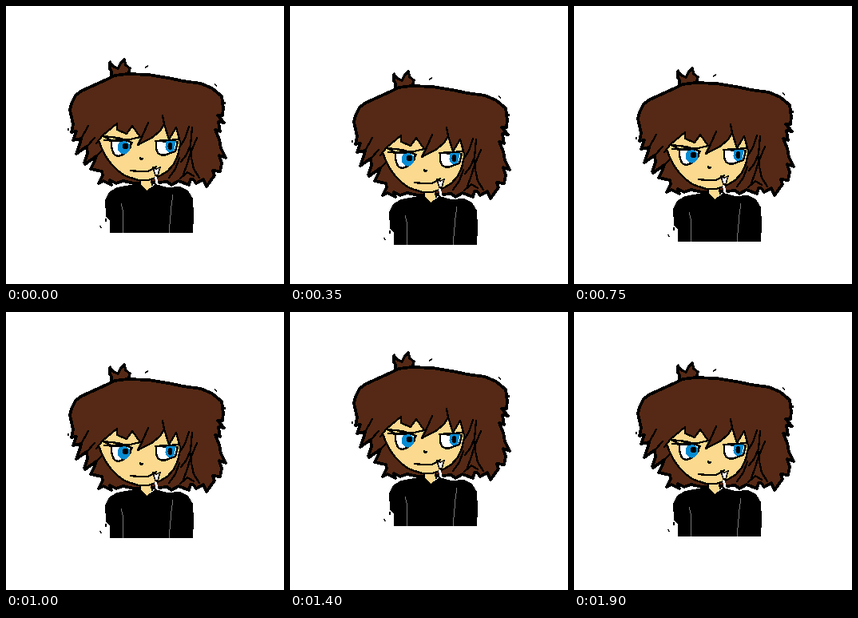
An HTML page for the animation above (1.95 s loop, 348 by 348 pixels).

```html
<!DOCTYPE html>
<html lang="en">
<head>
<meta charset="utf-8">
<title>Bobbing character</title>
<style>
  html, body { margin: 0; width: 100%; height: 100%; overflow: hidden; background: #fff; }
  svg { display: block; width: 348px; height: 348px; shape-rendering: crispEdges; }
  .ink { fill: none; stroke: #000; stroke-width: 2.3; stroke-linecap: round; stroke-linejoin: round; }
  .hair { fill: #552915; }
  .skin { fill: #fbd98e; }
  .iris { fill: #078bd2; }
  .outline { stroke: #000; stroke-linejoin: round; }
</style>
</head>
<body>
<svg viewBox="0 0 348 348">
  <g id="figure">
    <!-- tuft and back hair -->
    <path class="hair outline" stroke-width="3.2" d="M132 88 L132 81 L130 79 L130 70 L135 76 L140 78 L144 71 L148 67 L150 74 L155 78 L153 86 Z"/>
    <path class="hair outline" stroke-width="3.8" d="M80 130 L82 122 L87 112 L95 106 L104 102 L126 92 L136 87 L152 85 L178 86 L203 90 L222 94 L244 97 L258 103 L270 113
      L272 128 L271 137 L265 137 L273 146 L266 145 L268 157 L262 155 L267 167 L269 178 L275 190 L267 187 L270 197 L268 207 L259 206
      L261 212 L251 226 L247 217 L238 222 L232 214 L229 224 L216 219 L207 224 L202 220 L190 221 L160 222 L147 219
      L138 222 L130 218 L132 224 L122 219 L116 222 L121 212 L120 207 L106 204 L110 196 L113 188 L99 198 L98 196 L102 185 L101 176
      L88 185 L92 174 L94 166 L84 168 L88 157 L82 158 L84 148 Z"/>

    <!-- neck and face -->
    <path class="skin" d="M169 213 L181 213 L183 225 L176 231 L168 224 Z"/>
    <path class="skin outline" stroke-width="2.4" d="M114 160 L116 168 L120 179 L126 190 L132 198 L140 206 L148 212 L156 215 L166 218 L178 218 L190 214 L202 207 L210 198 L215 187 L218 174 L222 150 L120 144 Z"/>
    <path class="ink" d="M168 218 L168 224 M182 217 L183 224"/>
    <path fill="#fff" d="M186 214 L189 214 L191 224 L188 224 Z"/>

    <!-- left eye -->
    <path fill="#fff" class="outline" stroke-width="2.4" d="M132 168 Q131 177 135 185 Q139 190 146 186 Q156 182 157 171 L150 167 Z"/>
    <ellipse class="iris" cx="147.5" cy="177" rx="8" ry="8.5"/>
    <circle cx="149.5" cy="175.5" r="3.6"/>
    <path class="ink" d="M123 168 L139 169 L149 168 L158 171 M123 164 L134 169"/>
    <path class="ink" d="M122 163 L140 165 L151 168 L168 164"/>

    <!-- right eye -->
    <path fill="#fff" class="outline" stroke-width="2.4" d="M188 169 Q187 178 190 184 Q196 189 203 185 L212 182 L215 170 Z"/>
    <path class="iris" d="M201 169 Q197 177 203 183 L210 182 L213 169 Z"/>
    <ellipse cx="205.5" cy="175.5" rx="3" ry="4.5"/>
    <path class="ink" d="M187 169 L203 168 L218 167"/>

    <!-- nose, mouth, fang -->
    <path class="ink" d="M168 190 L169 192 L171 191"/>
    <path class="ink" d="M156 206 L166 207 L177 207 L184 204 L188 201"/>
    <path fill="#fff" class="outline" stroke-width="1.6" d="M184 202 L188 204 L193 202 L190 212 L187 212 Z"/>

    <!-- fringe -->
    <path class="hair" d="M96 120 H246 L240 216 L219 213 L217 190 L219 174 L213 152 L204 167 L198 148 L193 156 L184 164 L165 174 L171 162 L168 164 L158 150 L151 160 L139 155 L138 149 L121 162 L113 173 L99 174 Z"/>
    <path class="ink" d="M113 172 L121 162 L139 147 L139 155 L151 160 L158 150 L168 164 M178 146 L171 162 L165 174 L184 164 L193 156 L198 148 L196 137 M198 148 L204 167 L213 152 L219 174"/>
    <path class="ink" d="M233 152 L231 174 L226 186 L219 195 M219 174 L224 166 L229 151 M239 165 L231 184 L226 200 L222 211 M231 178 L232 190 L235 204 L242 215 M217 190 L212 204 L204 215 M235 213 L227 208 L218 216"/>
    <path class="ink" d="M94 166 L103 150 M101 176 L111 165 M113 188 L119 182"/>

    <!-- sweater -->
    <path d="M130 284 L130 269 L125 263 L124 243 L129 233 L139 227 L156 224 L167 221 L176 231 L187 223 L202 227 L218 226 L228 231 L234 241 L235 262 L234 284 Z"/>
    <path fill="none" stroke="#777" d="M144 247 L146 255 L147 266 L146 284 M209 236 L207 250 L206 262 L204 284"/>

    <!-- stray specks -->
    <path fill="none" stroke="#000" stroke-width="1.5" d="M174 77 L176 76 L178 75 M118 275 L119 278 M125 266 V270 M261 98 L264 100 M274 120 V123 M78 153 V156"/>
  </g>
</svg>
<script>
  const figure = document.getElementById('figure');
  const step = 50, steps = 39, swing = 16.3;

  function draw(now) {
    const k = Math.floor(now / step) % steps;
    const y = Math.round(swing * Math.sin(2 * Math.PI * k / steps));
    figure.setAttribute('transform', `translate(0 ${y})`);
  }

  const start = performance.now();
  function tick() {
    draw(performance.now() - start);
    requestAnimationFrame(tick);
  }
  tick();
</script>
</body>
</html>
```
